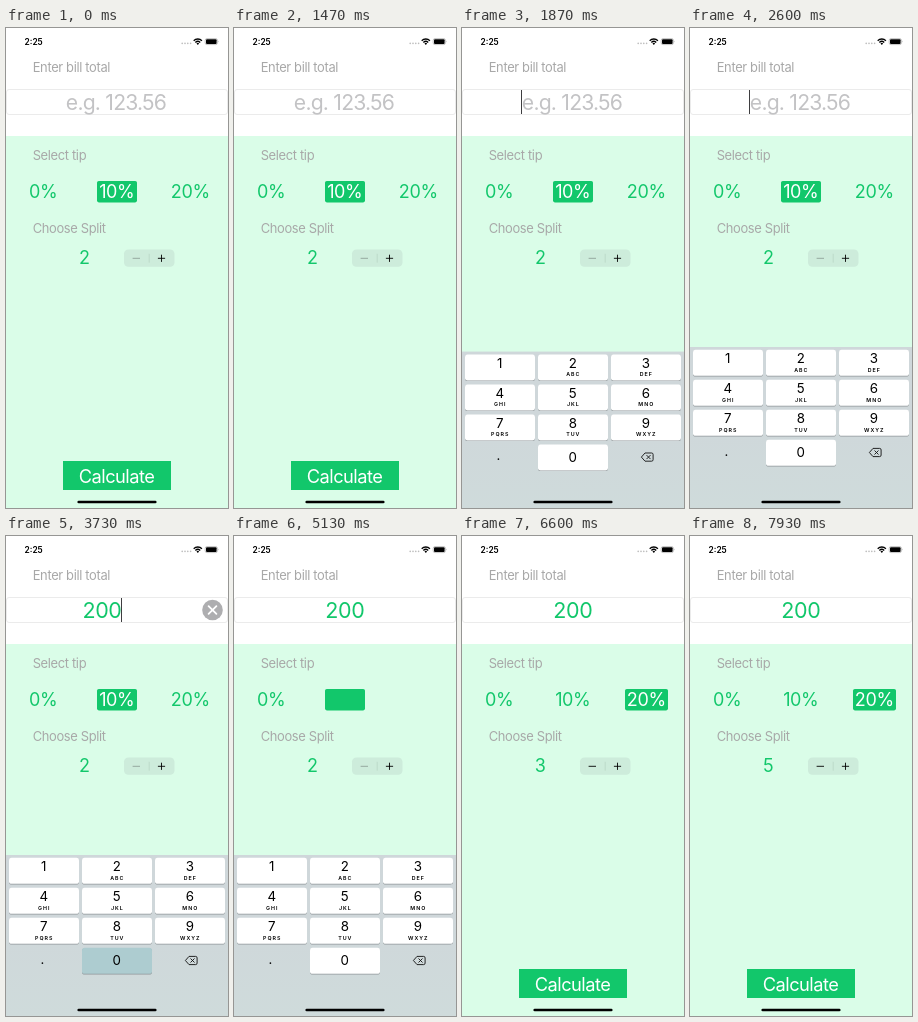
Write an HTML page that moves like this. It is 222 px wide and 480 px high and loops after 8000 ms.

```html
<!DOCTYPE html>
<html lang="en">
<head>
<meta charset="utf-8">
<title>Tip calculator</title>
<style>
  html, body { margin: 0; width: 100%; height: 100%; overflow: hidden; background: #fff; }
  svg { display: block; width: 100vw; height: 100vh; }
  text { font-family: Inter, Roboto, "Liberation Sans", sans-serif; }
  .mid { text-anchor: middle; }
  .label { font-size: 12.9px; letter-spacing: -.026em; fill: #a8a8a8; }
  .amount { font-size: 21.5px; letter-spacing: -.02em; fill: #12c76b; }
  .hint { font-size: 21.2px; letter-spacing: -.038em; fill: #c3c3c5; }
  .big { font-size: 18px; letter-spacing: -.02em; fill: #12c76b; }
  .go { font-size: 18.3px; letter-spacing: -.03em; fill: #fff; }
  .digit { font-size: 13.3px; fill: #000; }
  .letters { font-size: 5.3px; font-weight: 600; letter-spacing: 1px; fill: #000; }
</style>
</head>
<body>
<svg id="stage" viewBox="0 0 222 480">
  <linearGradient id="tray" x2="0" y2="1">
    <stop offset=".4" stop-color="#cfd7da"/><stop offset="1" stop-color="#cfdbdb"/>
  </linearGradient>
  <rect width="222" height="480" fill="#fff"/>
  <rect y="108" width="222" height="372" fill="#dafde8"/>

  <!-- status bar -->
  <text x="18.5" y="16.8" font-size="8.4" font-weight="600">2:25</text>
  <g fill="#bdbdbd">
    <circle cx="176.2" cy="15.4" r=".8"/><circle cx="179" cy="15.4" r=".8"/>
    <circle cx="181.8" cy="15.4" r=".8"/><circle cx="184.6" cy="15.4" r=".8"/>
  </g>
  <g fill="none" stroke="#000" stroke-width="1.4">
    <path d="M187.7 12.7a5.8 5.8 0 0 1 8.2 0M189.4 14.5a3.4 3.4 0 0 1 4.8 0"/>
  </g>
  <path d="M190.5 15.5a1.8 1.8 0 0 1 2.6 0l-1.3 1.4z"/>
  <rect x="199.2" y="10.6" width="12.2" height="6" rx="1.7" fill="none" stroke="#9a9a9a" stroke-width=".6"/>
  <rect x="200" y="11.3" width="10.6" height="4.6" rx="1"/>
  <path d="M212.2 12.6q1 1 0 2z" fill="#9a9a9a"/>

  <!-- bill -->
  <text class="label" x="26.7" y="44.4">Enter bill total</text>
  <rect x=".5" y="61.5" width="221" height="25" rx="2.5" fill="#fff" stroke="#e6e6e6" stroke-width=".8"/>
  <text id="hint" class="hint mid" x="110" y="81.6">e.g. 123.56</text>
  <text id="amount" class="amount mid" y="81.6"></text>
  <rect id="caret" y="62" width="1" height="24" fill="#3e3e40"/>
  <g id="clear">
    <circle cx="206.5" cy="74" r="10.3" fill="#aeaeb0"/>
    <path d="M202.6 70.1l7.8 7.8m0-7.8l-7.8 7.8" stroke="#fff" stroke-width="1.8" stroke-linecap="round"/>
  </g>

  <text class="label" x="26.7" y="132.4">Select tip</text>
  <g id="tips"></g>

  <!-- split -->
  <text class="label" x="26.7" y="205.2">Choose Split</text>
  <text id="split" class="big mid" x="78.2" y="236.3"></text>
  <rect x="118" y="221.5" width="50.5" height="17.3" rx="4.3" fill="#cdecdb"/>
  <path id="press" d="M143.3 221.5h20.9a4.3 4.3 0 0 1 4.3 4.3v8.7a4.3 4.3 0 0 1-4.3 4.3h-20.9z" fill="#b7d8c6"/>
  <path d="M143.2 225.8v8.8" stroke="#b2d0c0" stroke-width=".6"/>
  <path id="minus" d="M126.6 230.3h7.4" stroke-width=".9"/>
  <path d="M151.9 230.3h7.2m-3.6-3.6v7.2" stroke="#000" stroke-width=".9"/>

  <rect x="57" y="433" width="108" height="29" fill="#12c76b"/>
  <text class="big go mid" x="110.5" y="454.6">Calculate</text>

  <g id="pad"><rect width="222" height="162" fill="url(#tray)"/></g>
  <rect x="71.4" y="472.7" width="79.2" height="2.6" rx="1.3"/>
</svg>
<script>
const LOOP = 8000, FPS = 15;
const NS = "http://www.w3.org/2000/svg";
const $ = id => document.getElementById(id);

function add(parent, tag, attrs, text) {
  const el = document.createElementNS(NS, tag);
  for (const k in attrs) el.setAttribute(k, attrs[k]);
  if (text) el.textContent = text;
  parent.appendChild(el);
  return el;
}
const set = (el, k, v) => el.setAttribute(k, v);
const show = (el, on) => set(el, "opacity", +on);
const clamp = x => Math.max(0, Math.min(1, x));
const within = (t, [a, b]) => t >= a && t < b;

// tip buttons
const tips = [["0%", 37.3, 27], ["10%", 111, 40], ["20%", 184.5, 43]].map(([name, x, w]) => ({
  box: add($("tips"), "rect", { x: x - w / 2, y: 153, width: w, height: 21.4, rx: 1.8, fill: "#12c76b" }),
  text: add($("tips"), "text", { class: "big mid", x: x - .2, y: 170.4 }, name)
}));

// number pad
const pad = $("pad");
const letters = ["", "ABC", "DEF", "GHI", "JKL", "MNO", "PQRS", "TUV", "WXYZ"];
const keys = {};
function addKey(name, col, row, sub) {
  const x = 3 + 73 * col, y = 2.8 + 30 * row, mid = x + 34.8;
  add(pad, "rect", { x, y: y + .7, width: 70, height: 26, rx: 2.6, fill: "#8f9699" });
  keys[name] = add(pad, "rect", { x, y, width: 70, height: 26, rx: 2.6 });
  add(pad, "text", { class: "digit mid", x: mid, y: y + (row < 3 ? 13.4 : 17.2) }, name);
  if (sub) add(pad, "text", { class: "letters mid", x: mid + .5, y: y + 22 }, sub);
}
letters.forEach((sub, i) => addKey(String(i + 1), i % 3, Math.floor(i / 3), sub));
addKey("0", 1, 3);
add(pad, "text", { class: "digit mid", x: 36.4, y: 108.6 }, ".");
add(pad, "path", {
  d: "M179.4 105.5l3.6-4.1h6.6q1.5 0 1.5 1.5v5.2q0 1.5-1.5 1.5h-6.6zM184.5 103.5l4 4m0-4l-4 4",
  fill: "none", stroke: "#111", "stroke-width": .9, "stroke-linejoin": "round"
});

// timeline, ms
const FOCUS = 1490, BLUR = 5050, PICK = 5190;
const PAD_UP = 1548, PAD_DOWN = 5167;
const typed = [[2795, "2"], [3460, "20"], [3660, "200"]];
const keyPresses = { 2: [[2725, 2990]], 0: [[3395, 3590], [3660, 3860]] };
const blinks = [[2100, 2270, 2390, 2580], [4250, 4470, 4600, 4800]];
const plusPresses = [[6260, 6530], [6660, 6960], [7130, 7560]];
const counts = [6325, 6725, 7195];

// critically damped spring from 0 to 1
function spring(ms) {
  const x = Math.max(0, ms) * .017;
  return 1 - (1 + x) * Math.exp(-x);
}

function caretAlpha(t) {
  let a = t >= FOCUS && t < BLUR ? 1 : 0;
  for (const [out, off, back, on] of blinks)
    if (t >= out && t < on) a = Math.max(clamp((off - t) / (off - out)), clamp((t - back) / (on - back)));
  return a;
}

function draw(t) {
  const text = typed.reduce((s, [at, v]) => t >= at ? v : s, "");
  const editing = t < BLUR;
  $("amount").textContent = text;
  set($("amount"), "x", editing ? 96 : 110.8);
  show($("hint"), !text);
  show($("clear"), text && editing ? 1 : 0);
  set($("caret"), "x", text ? 95.5 + 6.5 * text.length : 59);
  set($("caret"), "opacity", caretAlpha(t));

  const chosen = t < PICK ? 1 : 2;
  tips.forEach(({ box, text }, i) => {
    const hidden = i === 1 && within(t, [BLUR, PICK]) || i === 2 && within(t, [4990, PICK]);
    show(box, i === chosen);
    show(text, !hidden);
    text.style.fill = i === chosen ? "#fff" : "";
  });

  const count = 2 + counts.filter(at => t >= at).length;
  $("split").textContent = count;
  set($("minus"), "stroke", count > 2 ? "#000" : "#8fa399");
  show($("press"), plusPresses.some(p => within(t, p)));

  for (const name in keys) {
    const down = (keyPresses[name] || []).some(p => within(t, p));
    set(keys[name], "fill", down ? "#adccd0" : "#fff");
  }
  const up = spring(t - PAD_UP) - spring(t - PAD_DOWN);
  set(pad, "transform", `translate(0 ${480 - 161 * up})`);
  show(pad, up > .002);
}

const start = performance.now();
function tick() {
  const t = (performance.now() - start) % LOOP;
  draw(Math.floor((t + 5) * FPS / 1000) * 1000 / FPS);
  requestAnimationFrame(tick);
}
tick();
</script>
</body>
</html>
```
